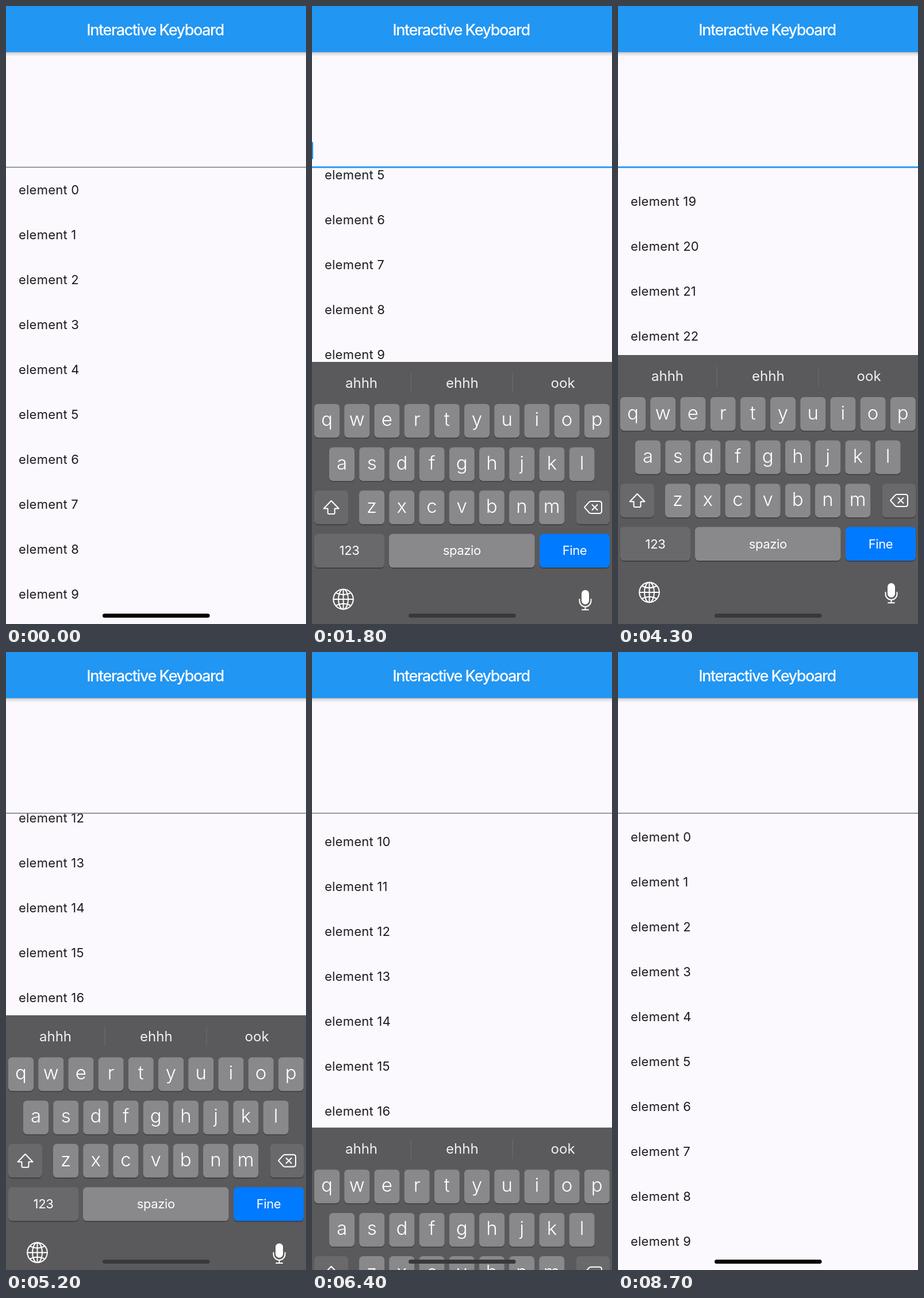
An HTML page that plays this animation: 522 px wide and 1073 px high, repeating every 8800 ms.

```html
<!DOCTYPE html>
<html lang="en">
<head>
<meta charset="utf-8">
<title>Interactive Keyboard</title>
<style>
  html, body { margin: 0; width: 100%; height: 100%; overflow: hidden; background: #fbf9fd; }
  svg { display: block; width: 100vw; height: 100vh; font-family: Inter, Roboto, sans-serif; }
  .item { font-size: 22px; letter-spacing: .22px; fill: #1c1b1f; }
  .title { font-size: 27px; font-weight: 500; letter-spacing: -1.45px; fill: #fff; }
  .mid { text-anchor: middle; fill: #fff; }
  .letter { font-size: 33px; font-weight: 300; }
  .word { font-size: 22px; letter-spacing: -.4px; }
  .hint { font-size: 24px; fill: #f2f2f3; }
  .icon { fill: none; stroke: #fff; stroke-width: 2; stroke-linejoin: round; stroke-linecap: round; }
</style>
</head>
<body>
<svg viewBox="0 0 522 1073" preserveAspectRatio="none">
  <defs>
    <linearGradient id="shade" x2="0" y2="1">
      <stop offset="0" stop-color="#000" stop-opacity=".26"/>
      <stop offset=".35" stop-color="#000" stop-opacity=".1"/>
      <stop offset="1" stop-color="#000" stop-opacity="0"/>
    </linearGradient>
    <clipPath id="listBox"><rect y="280" width="522" height="793"/></clipPath>
  </defs>
  <rect width="522" height="1073" fill="#fbf9fd"/>
  <g clip-path="url(#listBox)"><g id="list"></g></g>
  <rect id="line" width="522"/>
  <rect id="cursor" x="-1" y="236" width="3" height="30" rx="1.4" fill="#2196f3"/>
  <rect y="80" width="522" height="8" fill="url(#shade)"/>
  <rect width="522" height="80" fill="#2196f3"/>
  <text class="title mid" x="259.5" y="51">Interactive Keyboard</text>
  <g id="board"></g>
  <rect id="bar" x="168" y="1055" width="186.5" height="7" rx="3.5"/>
</svg>
<script>
const NS = 'http://www.w3.org/2000/svg';
const LOOP = 8800, STEP = 100, ROW = 78;
const KB_TOP = 606, KB_HEIGHT = 467;
const TAP = 1440, GRAB = 5030, GRAB_SCROLL = 992;
const $ = id => document.getElementById(id);
const list = $('list'), board = $('board');

function add(parent, tag, attrs, text) {
  const el = document.createElementNS(NS, tag);
  for (const k in attrs) el.setAttribute(k, attrs[k]);
  if (text) el.textContent = text;
  parent.append(el);
  return el;
}

const clamp = (v, lo, hi) => Math.min(hi, Math.max(lo, v));

// Smooth step from 0 to 1 between times a and b
function ease(t, a, b) {
  const u = clamp((t - a) / (b - a), 0, 1);
  return u * u * (3 - 2 * u);
}

function scrollAt(t) {
  return 416 * ease(t, 420, 1380)         // first swipe
    + 1488 * ease(t, 2150, 3600)          // long swipe down the list
    - 912 * ease(t, 3600, GRAB)           // and back
    - 240 * ease(t, GRAB, 5880)           // pull the keyboard down
    + 244 * ease(t, 6250, 7150)           // push it up again
    - 1005 * ease(t, 7680, 8560)          // swipe it away, past the top
    + 9 * ease(t, 8580, 8760);            // settle
}

// A spring raises the keyboard, later it follows the finger on the list
function dropAt(t, scroll) {
  if (t >= GRAB) return clamp(.99 * (GRAB_SCROLL - scroll), 0, KB_HEIGHT);
  const w = 0.0154 * Math.max(0, t - TAP);
  return KB_HEIGHT * (1 + w) * Math.exp(-w);
}

const sessions = [[TAP, 5050], [7250, 7800]];

function focusAt(t) {
  return sessions.reduce((f, [a, b]) => f + ease(t, a, a + 170) - ease(t, b, b + 170), 0);
}

// The caret blinks once a second with soft edges
function caretAt(t) {
  const open = sessions.find(([a, b]) => t >= a && t < b);
  if (!open) return 0;
  const p = (t - open[0]) % 1000;
  return clamp((650 - p) / 150, 0, 1) + clamp((p - 850) / 150, 0, 1);
}

function mix(a, b, u) {
  return `rgb(${a.map((v, i) => Math.round(v + (b[i] - v) * u))})`;
}

function key(x, y, w, fill) {
  const box = { x, width: w, height: 58.5, rx: 6.5 };
  add(board, 'rect', { ...box, y: y + 1.6, fill: '#3d3c3e' });
  add(board, 'rect', { ...box, y, fill });
}

function label(cls, x, y, text) {
  add(board, 'text', { class: 'mid ' + cls, x, y }, text);
}

function icon(d) {
  add(board, 'path', { class: 'icon', d });
}

function buildBoard() {
  const plain = '#89888a', dark = '#69686a';
  const rowY = r => 73 + r * 75.2;
  add(board, 'rect', { width: 522, height: 480, fill: '#5a595b' });
  ['ahhh', 'ehhh', 'ook'].forEach((s, i) => label('hint', 86 + i * 175.3, 45, s));
  for (const x of [171.5, 348.5]) add(board, 'rect', { x, y: 20, width: 1.2, height: 34, fill: '#6d6c6e' });

  [['qwertyuiop', 4], ['asdfghjkl', 30], ['zxcvbnm', 82]].forEach(([row, left], r) => {
    [...row].forEach((c, i) => {
      const x = left + i * 52.2;
      key(x, rowY(r), 44, plain);
      label('letter', x + 22, rowY(r) + 38.5, c);
    });
  });

  key(4, rowY(2), 59, dark);
  key(459.5, rowY(2), 58.5, dark);
  [['123', 4, 122, dark], ['spazio', 134, 253.5, plain], ['Fine', 396, 122, '#007aff']].forEach(([s, x, w, fill]) => {
    key(x, rowY(3), w, fill);
    label('word', x + w / 2, 335.5, s);
  });

  // Shift and delete
  icon('M33.5 241 L46.5 254.5 H39.5 V262 Q39.5 264 37.5 264 H29.5 Q27.5 264 27.5 262 V254.5 H20.5 Z');
  icon('M474 252.5 L482 243.5 Q483.5 242 485.5 242 H500 Q504 242 504 246 V259 Q504 263 500 263 H485.5 Q483.5 263 482 261.5 Z M487.5 248 l9 9 m0 -9 l-9 9');

  // Globe
  const at = { cx: 54.5, cy: 412, class: 'icon' };
  add(board, 'circle', { ...at, r: 17.3 });
  add(board, 'ellipse', { ...at, rx: 8.5, ry: 17.3 });
  icon('M54.5 394.7 V429.3 M37.2 412 H71.8 M41.5 401 Q54.5 407.5 67.5 401 M41.5 423 Q54.5 416.5 67.5 423');

  // Microphone
  add(board, 'rect', { x: 469, y: 396, width: 13, height: 25, rx: 6.5, fill: '#fff' });
  icon('M465.5 412 V415 A10 10 0 0 0 485.5 415 V412 M475.5 425 V430 M470 430.3 H481');
}

const items = Array.from({ length: 12 }, () => add(list, 'text', { class: 'item', x: 22 }));

function draw(t) {
  const scroll = scrollAt(t), drop = dropAt(t, scroll);
  const first = Math.max(0, Math.floor((scroll - 70) / ROW));
  items.forEach((el, i) => {
    el.textContent = 'element ' + (first + i);
    el.setAttribute('y', 327 + (first + i) * ROW - scroll);
  });

  board.setAttribute('transform', `translate(0 ${KB_TOP + drop})`);

  const f = focusAt(t), h = 1.5 + 1.3 * f;
  $('line').setAttribute('y', 279.9 - h / 2);
  $('line').setAttribute('height', h);
  $('line').setAttribute('fill', mix([124, 122, 126], [33, 150, 243], f));
  $('cursor').setAttribute('opacity', caretAt(t));

  // The home bar turns grey while the keyboard lies under it
  const cover = clamp((KB_HEIGHT - drop) / 150, 0, 1);
  $('bar').setAttribute('fill', mix([0, 0, 0], [57, 56, 58], cover));
}

function tick() {
  const t = performance.now() % LOOP;
  draw(Math.floor(t / STEP) * STEP);
  requestAnimationFrame(tick);
}

buildBoard();
draw(0);
requestAnimationFrame(tick);
</script>
</body>
</html>
```
